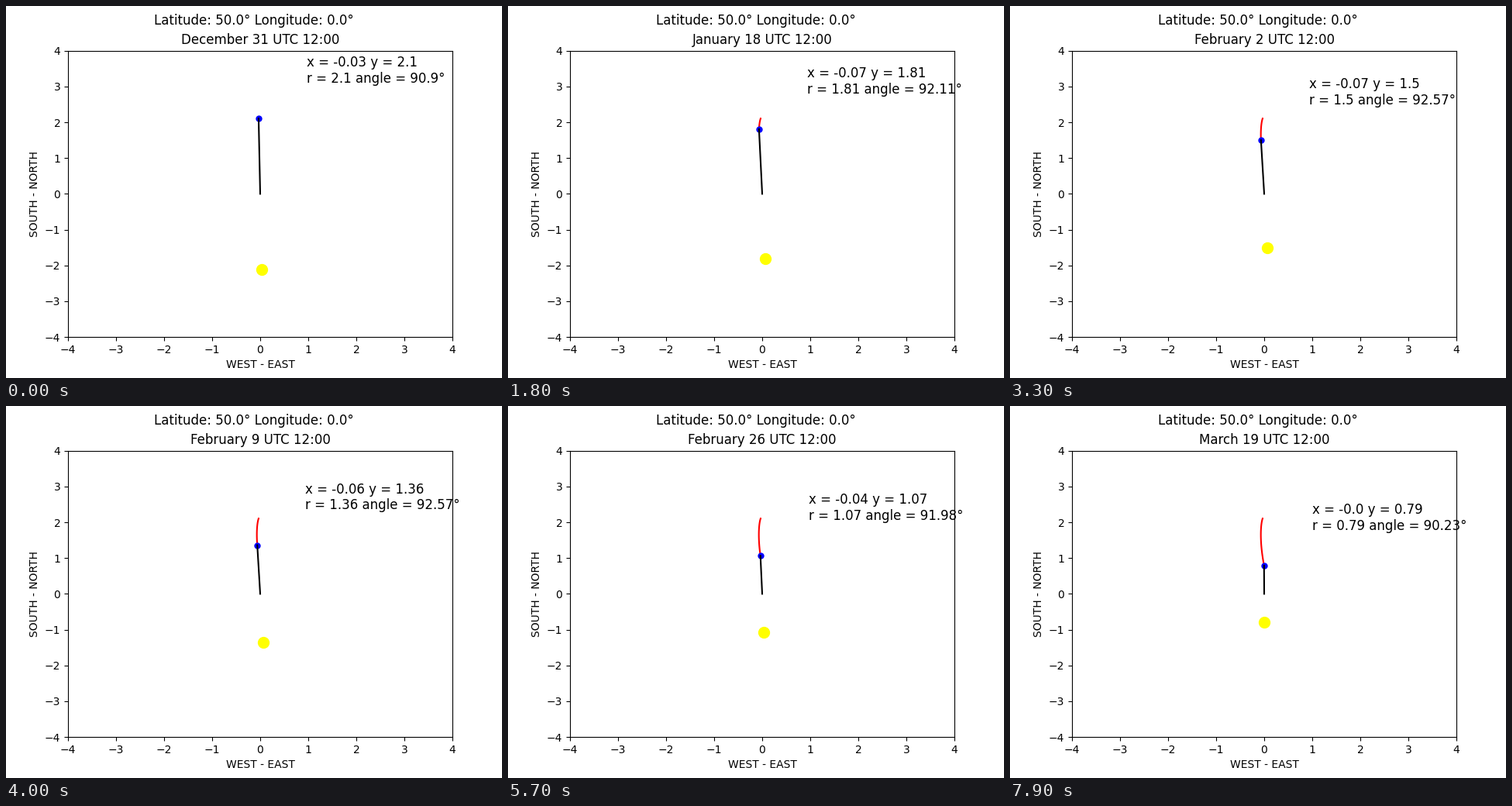
A matplotlib script that plays this animation: 640 by 480 pixels, repeating every 8 s.

```python
import numpy as np
import matplotlib.pyplot as plt
from matplotlib.animation import FuncAnimation

FRAMES, INTERVAL = 80, 100
LAT = np.radians(50.0)
TILT = np.radians(23.44)
EQUINOX, YEAR = 80.2, 365.25
HEIGHT = np.cos(LAT)  # gnomon height
MONTHS = (("January", 31), ("February", 29), ("March", 31))


def date_label(i):
    if i == 0:
        return "December 31"
    for name, days in MONTHS:
        if i <= days:
            return f"{name} {i}"
        i -= days


def day_number(i):
    """Day of a common year; the leap day shares its number with March 1."""
    if i == 0:
        return 365
    return i if i <= 60 else i - 1


def shadow(day):
    """Tip of the noon shadow for a sun on a circular orbit."""
    lon = 2 * np.pi * (day - EQUINOX) / YEAR
    dec = np.arcsin(np.sin(TILT) * np.sin(lon))
    asc = np.arctan2(np.cos(TILT) * np.sin(lon), np.cos(lon))
    hour = lon - asc
    east = -np.cos(dec) * np.sin(hour)
    north = np.sin(dec) * np.cos(LAT) - np.cos(dec) * np.sin(LAT) * np.cos(hour)
    up = np.sin(dec) * np.sin(LAT) + np.cos(dec) * np.cos(LAT) * np.cos(hour)
    return -HEIGHT * east / up, -HEIGHT * north / up


path = np.array([shadow(day_number(i)) for i in range(FRAMES)])

fig, ax = plt.subplots(figsize=(6.4, 4.8), dpi=100)
ax.set(xlim=(-4, 4), ylim=(-4, 4), xlabel="WEST - EAST", ylabel="SOUTH - NORTH")
fig.suptitle("Latitude: 50.0° Longitude: 0.0°", fontsize=12)
title = ax.set_title("", fontsize=12)

trail, = ax.plot([], [], color="red")
tip, = ax.plot([], [], "o", color="blue", markersize=5)
rod, = ax.plot([], [], color="black")
sun, = ax.plot([], [], "o", color="yellow", markersize=10)
note = ax.text(0, 0, "", fontsize=12)


def update(i):
    x, y = (float(v) for v in path[i])
    r = np.hypot(x, y)
    angle = np.degrees(np.arctan2(y, x))
    title.set_text(f"{date_label(i)} UTC 12:00")
    trail.set_data(path[:i + 1, 0], path[:i + 1, 1])
    tip.set_data([x], [y])
    rod.set_data([0, x], [0, y])
    sun.set_data([-x], [-y])
    note.set_position((x + 1, y + 1))
    note.set_text(f"x = {round(x, 2)} y = {round(y, 2)}\n"
                  f"r = {round(float(r), 2)} angle = {round(float(angle), 2)}°")
    return trail, tip, rod, sun, note, title


anim = FuncAnimation(fig, update, frames=FRAMES, init_func=lambda: update(0),
                     interval=INTERVAL, repeat=True, repeat_delay=0, blit=False)
plt.show()
```
